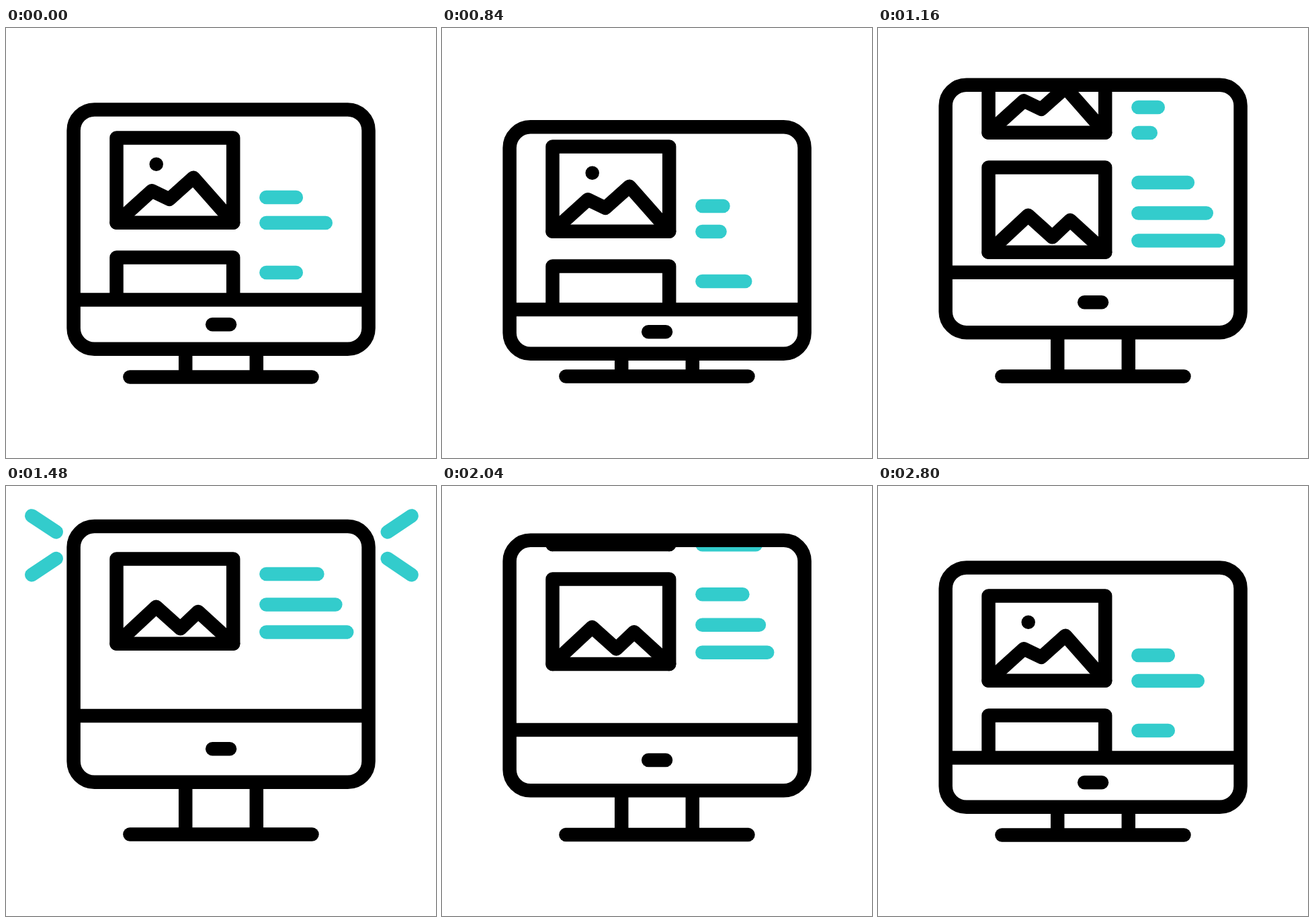
These frames come from a looping animation (640 px wide and 640 px high, 3000 ms). An HTML page:

```html
<!DOCTYPE html>
<html lang="en">
<head>
<meta charset="utf-8">
<title>Scrolling monitor</title>
<style>
  html, body { margin: 0; width: 100%; height: 100%; overflow: hidden; background: #fff; }
  svg { display: block; width: 100vw; height: 100vh; }
  .ink, .teal { fill: none; stroke: #000; stroke-width: 20.5; stroke-linecap: round; stroke-linejoin: round; }
  .teal { stroke: #3cc; }
  .flat { stroke-linecap: butt; }
</style>
</head>
<body>
<svg viewBox="0 0 640 640">
  <clipPath id="screen"><rect id="hole" x="100" width="440"/></clipPath>
  <g clip-path="url(#screen)">
    <g id="page">
      <g class="ink">
        <rect x="164.5" y="163.4" width="173.7" height="126.4"/>
        <path d="M164.5 289.8L217 242.3L243 254.8L279 222.7L338.2 289.8"/>
        <path d="M223.7 202.8h.01"/>
        <rect x="164.5" y="341.4" width="173.7" height="126.4"/>
        <path d="M164.5 467.8L223.5 412.8L259.5 445.2L286 420L338.2 467.8"/>
      </g>
      <g class="teal" id="bars"></g>
    </g>
  </g>
  <g class="ink">
    <path class="flat" id="legs"/>
    <rect id="frame" x="100.6" width="439" rx="31"/>
    <path class="flat" id="divider"/>
    <path id="button"/>
    <path id="base"/>
  </g>
  <g class="teal" id="rays"></g>
</svg>
<script>
const LOOP = 3000, STEP = 40;
const $ = id => document.getElementById(id);
const set = (el, attrs) => { for (const k in attrs) el.setAttribute(k, attrs[k]); };
const addPath = parent =>
  parent.appendChild(document.createElementNS('http://www.w3.org/2000/svg', 'path'));

// Eased value of a [time, value] list
function at(t, keys) {
  if (t <= keys[0][0]) return keys[0][1];
  for (let i = 1; i < keys.length; i++) {
    const [t0, a] = keys[i - 1], [t1, b] = keys[i];
    if (t < t1) {
      const s = (t - t0) / (t1 - t0);
      return a + (b - a) * s * s * (3 - 2 * s);
    }
  }
  return keys[keys.length - 1][1];
}

// Rest, squash, stretch, hold, back to rest
const pose = (rest, squash, stretch) =>
  [[47, rest], [713, rest + squash], [1380, rest + stretch], [1780, rest + stretch], [2447, rest]];

const top_ = pose(121.5, 35, -61.4);
const divider = pose(404.6, 22.5, -62.6);
const button = pose(441.2, 17.4, -50);
const bottom = pose(477.8, 11.6, -37);
const base = pose(519.6, -1, -1);
const shift = pose(0, 20.9, -62);
const scroll = [[890, 0], [1400, -171], [1967, -171], [2483, 0]];

const bars = [
  { y: 252, end: [[47, 442], [1047, 427], [1400, 427], [2000, 437], [2440, 442]] },
  { y: 290, end: [[47, 486], [1047, 416], [1400, 416], [2000, 477], [2440, 486]] },
  { y: 364, end: [[90, 442], [1400, 474], [2660, 442]] },
  { y: 409.5, end: [[90, 478], [1400, 501], [2640, 465]] },
  { y: 450.5, end: [[90, 505], [1400, 518], [2640, 473]] }
].map(b => ({ ...b, el: addPath($('bars')) }));

// Inner and outer ends
const rays = [
  [74.7, 68.4, 38.3, 44.4], [74.7, 108, 38.3, 132.2],
  [567.8, 68.4, 603.6, 44.4], [567.8, 108, 603.6, 132.2]
].map(p => ({ p, el: addPath($('rays')) }));
const rayHead = [[1213, 0], [1480, 1]];
const rayTail = [[1480, 0], [1747, 1]];

function draw(t) {
  const top = at(t, top_), div = at(t, divider), bot = at(t, bottom), foot = at(t, base);
  set($('hole'), { y: top, height: div - top });
  set($('frame'), { y: top, height: bot - top });
  set($('divider'), { d: `M100.6 ${div}H539.6` });
  set($('button'), { d: `M307.2 ${at(t, button)}H333` });
  set($('legs'), { d: `M267.2 ${bot}V${foot}M372.8 ${bot}V${foot}` });
  set($('base'), { d: `M184.4 ${foot}H455.5` });
  set($('page'), { transform: `translate(0 ${at(t, shift) + at(t, scroll)})` });
  for (const b of bars) set(b.el, { d: `M387.4 ${b.y}H${at(t, b.end) - 10.2}` });

  const head = at(t, rayHead), tail = at(t, rayTail);
  $('rays').style.display = head > tail ? '' : 'none';
  for (const { p: [x0, y0, x1, y1], el } of rays) {
    const point = k => `${x0 + (x1 - x0) * k} ${y0 + (y1 - y0) * k}`;
    set(el, { d: `M${point(tail)}L${point(head)}` });
  }
}

const start = performance.now();
function tick() {
  const t = (performance.now() - start) % LOOP;
  draw(Math.floor(t / STEP) * STEP);
  requestAnimationFrame(tick);
}
tick();
</script>
</body>
</html>
```
